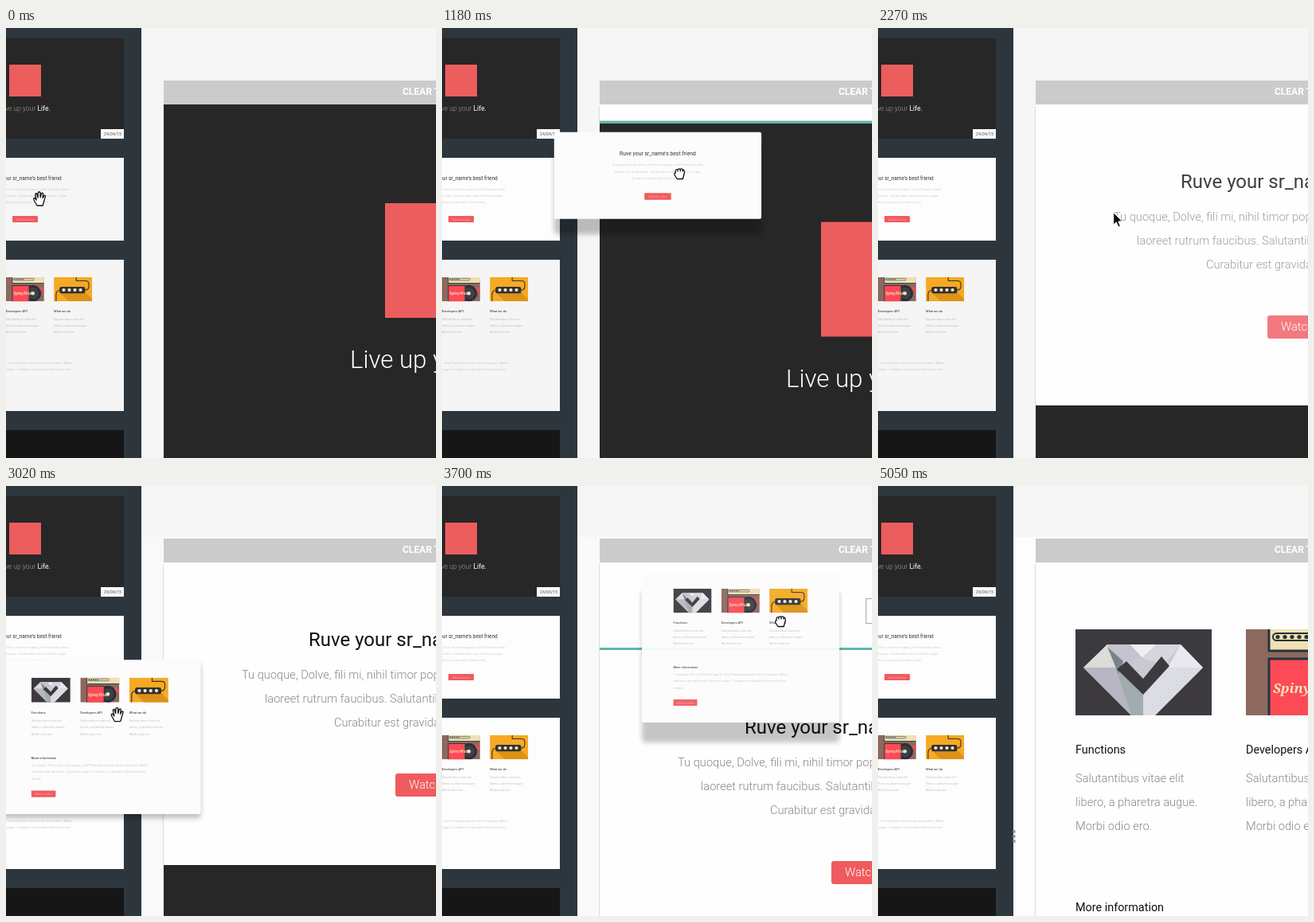
An HTML page for the animation above (5.25 s loop, 540x540 px).

```html
<!DOCTYPE html>
<html lang="en">
<head>
<meta charset="utf-8">
<title>Drag and drop page builder</title>
<style>
  html, body { margin: 0; width: 100%; height: 100%; overflow: hidden; background: #f6f6f6; }
  svg { display: block; width: 100%; height: 100%; font-family: Roboto, Lato, sans-serif; }
  text { white-space: pre; }
  .light { font-weight: 300; }
</style>
</head>
<body>
<svg id="stage" viewBox="0 0 540 540"></svg>
<script>
const LOOP = 5250;
const RED = '#f05b5f', DARK = '#272727', TOP = 96;
const svg = document.getElementById('stage');

const rect = (x, y, w, h, fill, more = '') =>
  `<rect x="${x}" y="${y}" width="${w}" height="${h}" fill="${fill}" ${more}/>`;
const text = (x, y, size, fill, str, more = '') =>
  `<text x="${x}" y="${y}" font-size="${size}" fill="${fill}" ${more}>${str}</text>`;
const poly = (points, fill) => `<polygon points="${points}" fill="${fill}"/>`;
const path = (d, more) => `<path d="${d}" ${more}/>`;
const circle = (x, y, r, fill) => `<circle cx="${x}" cy="${y}" r="${r}" fill="${fill}"/>`;
const LIGHT = 'class="light"', MID = 'text-anchor="middle"';

const headline = "Ruve your sr_name's best friend";
const intro = [
  'Tu quoque, Dolve, fili mi, nihil timor populi, nihil! Phasellus dolor',
  'laoreet rutrum faucibus. Salutantibus vitae elit libero, augue',
  'Curabitur est gravida et libero vitae.'
];
const columns = ['Functions', 'Developers API', 'What we do'];
const blurb = ['Salutantibus vitae elit', 'libero, a pharetra augue.', 'Morbi odio ero.'];
const info = [
  'Tu quoque, fili mi, nihil timor populi, nihil! Phasellus laoreet rutrum faucibus. Morbi',
  'odio ero vitae elit libero, a pharetra augue. Curabitur est gravida et libero vitae est',
  'dictum.'
];

// Illustrations, each 171 x 108
const pictures = `<defs>
  <filter id="soft" x="-10%" y="-20%" width="120%" height="140%"><feGaussianBlur stdDeviation="3"/></filter>
  <clipPath id="crop">${rect(0, 0, 171, 108, '#000')}</clipPath>
  <g id="pic0" clip-path="url(#crop)">
    ${rect(0, 0, 171, 108, '#3c3a3f')}
    ${poly('10,48 40,19 68,19 84,36 102,19 132,19 160,48 100,108 70,108', '#c9c9d2')}
    ${poly('10,48 40,19 52,48', '#dcdcd8')}
    ${poly('40,19 68,19 84,36 58,42', '#c4c3ce')}
    ${poly('68,19 102,19 84,36', '#f0f0f2')}
    ${poly('102,19 132,19 112,44 84,36', '#d6d6de')}
    ${poly('132,19 160,48 116,48', '#e8e8ee')}
    ${poly('10,48 50,48 70,108', '#b7b6c2')}
    ${poly('50,48 85,82 85,108 70,108', '#9fadae')}
    ${poly('116,48 160,48 100,108 85,108 85,82', '#dcdce4')}
    ${poly('40,22 60,40 54,56', '#77848a')}
    ${poly('52,50 64,40 85,62 108,34 118,46 85,82', '#3c3a3f')}
  </g>
  <g id="pic1" clip-path="url(#crop)">
    ${rect(0, 0, 171, 108, '#8d685f')}
    ${rect(29, -6, 150, 33, '#f2e0b4', 'stroke="#22343c" stroke-width="3"')}
    <rect x="34" y="5" width="92" height="9" rx="4.5" fill="none" stroke="#22343c" stroke-width="2"/>
    ${[40, 49, 58, 67, 76].map(x => circle(x, 9.5, 2.6, '#22343c')).join('')}
    ${circle(121, 72, 37, '#2b2f36')}${circle(121, 72, 26, '#3c4047')}${circle(121, 72, 8, '#f2e0b4')}
    ${path('M152 40 L171 58 L171 70 L150 52Z', 'fill="#fc4a56"')}
    ${rect(29, 37, 75, 80, '#fc4a56', 'stroke="#22343c" stroke-width="3"')}
    ${text(34, 80, 17, '#f8e3b8', 'SpinyWub', 'font-family="Noto Serif, serif" font-style="italic" font-weight="700"')}
  </g>
  <g id="pic2" clip-path="url(#crop)">
    ${rect(0, 0, 171, 108, '#f6a923')}
    ${poly('26,68 140,68 171,98 171,108 66,108', '#dc9217')}
    ${path('M10 108 V80 Q10 58 28 58 M138 58 Q156 58 156 40 V28 Q156 16 140 16 H100 V0', 'fill="none" stroke="#3a3230" stroke-width="4"')}
    ${rect(25, 43, 115, 29, '#33302f', 'rx="9"')}
    ${[44, 69, 94, 119].map(x => circle(x, 57, 7.5, '#f6ead2')).join('')}
  </g>
</defs>`;

const pic = (i, x, y, scale) => `<use href="#pic${i}" transform="translate(${x} ${y}) scale(${scale})"/>`;

// Small cards, centred on 0,0
const introCard = () =>
  text(0, -24, 6.5, '#333', headline, MID) +
  intro.map((s, i) => text(0, -11.5 + i * 8, 4.04, '#bbb', s, MID + ' ' + LIGHT)).join('') +
  rect(-16, 21, 32, 8, RED, 'rx="0.8"') +
  text(0, 26.5, 4, '#f7a5a7', 'Watch video', MID);

const featureCard = () => columns.map((name, i) => {
  const x = -84.5 + i * 60.3;
  return pic(i, x, -73, 0.281) + text(x, -29, 4, '#222', name) +
    blurb.map((s, j) => text(x, -19 + j * 8.2, 4.04, '#aaa', s, LIGHT)).join('');
}).join('') +
  text(-84.5, 27, 4, '#222', 'More information') +
  info.map((s, i) => text(-84.5, 36 + i * 8.3, 4.04, '#b5b5b5', s, LIGHT)).join('') +
  rect(-84.5, 66, 30, 8, RED, 'rx="0.8"') +
  text(-69.5, 71.5, 4, '#f7a5a7', 'Watch video', MID);

const card = (id, h, body) => `<g id="${id}">
  ${rect(-124, -h / 2, 248, h, '#000', `id="${id}Shade" rx="4" filter="url(#soft)" opacity="0.24"`)}
  ${rect(-124, -h / 2, 248, h, '#fcfcfc', 'rx="2"')}${body}</g>`;

const marker = id => `<g id="${id}">
  ${rect(198, -3, 342, 3, '#5db8a8')}
  <rect id="${id}Icon" x="532.5" width="32" height="31" fill="none" stroke="#aaa"/></g>`;

const page = `
  <g id="features">
    ${rect(198, 0, 342, 540, '#fefefe')}
    <g id="featureBody">
      ${columns.map((name, i) => {
        const x = 248 + i * 214;
        return pic(i, x, 84, 1) + text(x, 240, 14.4, '#111', name) +
          blurb.map((s, j) => text(x, 276 + j * 30, 14.65, '#888', s, LIGHT)).join('');
      }).join('')}
      ${text(248, 438, 14.4, '#111', 'More information')}
    </g>
  </g>
  <g id="intro">
    ${rect(198, 0, 342, 540, '#fefefe')}
    <g id="introBody">
      ${text(380, 105, 24, '#111', headline)}
      ${intro.map((s, i) => text([296, 325, 412][i], 146 + i * 30, 14.65, '#888', s, LIGHT)).join('')}
      ${rect(489, 265, 118, 29, RED, 'rx="3"')}
      ${text(506, 284, 14.65, '#fff', 'Watch video', LIGHT)}
    </g>
  </g>
  <g id="hero">
    ${rect(198, 0, 342, 540, DARK)}
    ${rect(476, 124, 144, 144, '#ec5d5d')}
    ${text(432, 331, 31.2, '#fff', 'Live up your Life.', LIGHT)}
  </g>`;

const sidebar = `
  ${rect(0, 0, 170, 540, '#2d363d')}
  ${rect(0, 13, 148, 126, DARK)}
  ${rect(4, 46, 40, 40, '#ec5d5d')}
  ${text(24, 103.5, 8.6, '#999', 'Live up your <tspan fill="#fff" font-weight="400">Life.</tspan>', MID + ' ' + LIGHT)}
  ${rect(119, 127, 29, 12, '#f8f8f8')}
  ${text(134, 135.3, 5.2, '#555', '24/04/15', MID)}
  ${rect(0, 163, 148, 104, '#f6f6f6', 'id="slot1"')}
  <g transform="translate(24 215)">${introCard()}</g>
  ${rect(0, 291, 148, 190, '#f5f5f5', 'id="slot2"')}
  <g transform="translate(24 386)">${featureCard()}</g>
  ${rect(0, 505, 148, 35, '#161616')}`;

const ink = 'fill="#fff" stroke="#111" stroke-width="1.3" stroke-linejoin="round"';
const cursors = `<g id="cursor">
  <g id="open">${path('M-3 9 L-7 2 Q-8 -.5 -6 -.5 L-3.8 2 L-5.2 -4.5 Q-5 -7 -3.4 -6.2 L-2 -1 L-1.6 -7.5 Q-.2 -9 1 -7.5 L1.1 -1.2 L2.6 -6.4 Q4.2 -7.6 4.6 -5.8 L4 -.4 L5.8 -3.6 Q7.6 -4.2 7.4 -2.4 L5.4 4.5 L4.2 9Z', ink)}</g>
  <g id="fist">${path('M-3 6.5 L-6 2 Q-7 -1 -5 -1 L-5 -4 Q-4 -6 -2.2 -5 Q-1 -7 1 -5.6 Q3 -7 4 -5 Q6.6 -5 6.2 -1 L4.2 6.5Z M-2.2 -5 V-2.5 M1 -5.6 V-2.5 M4 -5 V-2.5', ink)}</g>
  <g id="arrow">${path('M0 0 V15.5 L3.6 12.2 L6.2 18 L8.8 16.9 L6.2 11.3 L11 11Z', 'fill="#111" stroke="#fff" stroke-width="1"')}</g>
</g>`;

svg.innerHTML = pictures +
  rect(0, 0, 540, 540, '#f6f6f6') +
  rect(170, 64, 370, 476, '#fdfdfd', 'id="glow"') +
  rect(197, TOP + 2, 1, 1, '#dcdcdc', 'id="edge"') +
  page + marker('mark1') + marker('mark2') +
  rect(198, 66, 342, 30, '#cbcbcb') +
  text(498, 84, 12, '#fff', 'CLEAR THE PAGE', 'font-weight="700"') +
  sidebar +
  `<g id="dots">${[434, 440, 446].map(y => circle(171, y, 1.9, '#999')).join('')}</g>` +
  card('drag1', 104, introCard()) + card('drag2', 190, featureCard()) + cursors;

const el = {};
svg.querySelectorAll('[id]').forEach(node => el[node.id] = node);

const set = (id, name, value) => el[id].setAttribute(name, value);
const show = (id, on) => set(id, 'visibility', on ? 'visible' : 'hidden');
const move = (id, x, y, s = 1) => set(id, 'transform', `translate(${x} ${y}) scale(${s})`);

const ramp = (t, a, b) => Math.min(1, Math.max(0, (t - a) / (b - a)));
const ease = (t, a, b) => { const p = ramp(t, a, b); return p * p * (3 - 2 * p); };

// Linear track: rows of [time, ...values]
function track(t, rows) {
  const i = rows.findIndex(row => row[0] > t);
  if (i === 0) return rows[0].slice(1);
  if (i < 0) return rows[rows.length - 1].slice(1);
  const [a, b] = [rows[i - 1], rows[i]];
  const p = (t - a[0]) / (b[0] - a[0]);
  return a.slice(1).map((v, k) => v + (b[k + 1] - v) * p);
}

// Offset x, y, scale, shadow drop
const drag1 = [[480, 0, 0, 1, 0], [650, 18, 8, 1.06, 12], [810, 56, 16, 1.08, 15],
  [980, 140, -6, 1.08, 16], [1010, 155, -10, 1.08, 16], [1460, 397, -62, 1, 22]];
const drag2 = [[2700, 0, 0, 1, 0], [3020, 93.5, -70.5, 1.02, 5], [3130, 150, -104, 1.02, 10],
  [3190, 155, -106, 1.02, 12], [3640, 351, -184, 1, 25]];
const pointer = [[0, 42, 214], [480, 42, 214], [650, 61, 221], [810, 102, 228], [980, 188, 206],
  [1010, 204, 202], [1460, 452, 152], [2090, 452, 152], [2560, 46, 359], [2700, 46, 359],
  [3020, 139, 287], [3130, 206, 254], [3190, 212, 251], [3640, 425, 170], [3900, 425, 170],
  [4200, 481, 165], [4400, 481, 165], [4720, 560, 150]];
const hands = [[0, 'open'], [150, 'fist'], [480, 'open'], [1010, 'fist'], [1900, 'arrow'],
  [2350, 'open'], [2600, 'fist'], [2700, 'open'], [3190, 'fist'], [3900, 'arrow']];

function drawCard(id, t, rows, cy, start, drop) {
  const [dx, dy, s, shade] = track(t, rows);
  move(id, 24 + dx, cy + dy, s);
  set(id + 'Shade', 'transform', `translate(0 ${shade})`);
  set(id, 'opacity', 1 - 0.06 * ramp(t, drop - 300, drop - 100) - 0.94 * ramp(t, drop, drop + 150));
  show(id, t >= start && t < drop + 150);
}

function drawMarker(id, gap, on) {
  move(id, 0, TOP + gap);
  set(id + 'Icon', 'y', 6.5 - gap / 2 - 16);
  show(id, on && gap > 3);
  show(id + 'Icon', on && gap > 60);
}

function draw(t) {
  const h1 = 135 * ease(t, 1080, 1460) + 245 * ease(t, 1760, 2300);
  const h2 = 110 * ease(t, 3280, 3640) + 426 * ease(t, 4182, 4760);

  move('features', 0, TOP);
  move('intro', 0, TOP + h2);
  move('hero', 0, TOP + h1 + h2);
  set('introBody', 'opacity', ramp(t, 1950, 2350));
  set('featureBody', 'opacity', ramp(t, 4790, 5040));
  drawMarker('mark1', h1, t < 1850);
  drawMarker('mark2', h2, t < 3900);
  set('edge', 'height', Math.max(0, h1 + h2 - 2));

  set('glow', 'opacity', track(t, [[2620, 0], [3020, 0.4], [3760, 0.6], [4290, 1]])[0]);
  set('slot1', 'fill', t < 480 ? '#f6f6f6' : '#fdfdfd');
  set('slot2', 'fill', t < 2620 ? '#f5f5f5' : '#fdfdfd');
  show('dots', t >= 4500);

  drawCard('drag1', t, drag1, 215, 480, 1760);
  drawCard('drag2', t, drag2, 386, 2700, 3780);

  move('cursor', ...track(t, pointer));
  const hand = hands.filter(row => row[0] <= t).pop()[1];
  ['open', 'fist', 'arrow'].forEach(id => show(id, id === hand));
}

const begin = performance.now();
function tick() {
  draw((performance.now() - begin) % LOOP);
  requestAnimationFrame(tick);
}
tick();
</script>
</body>
</html>
```
